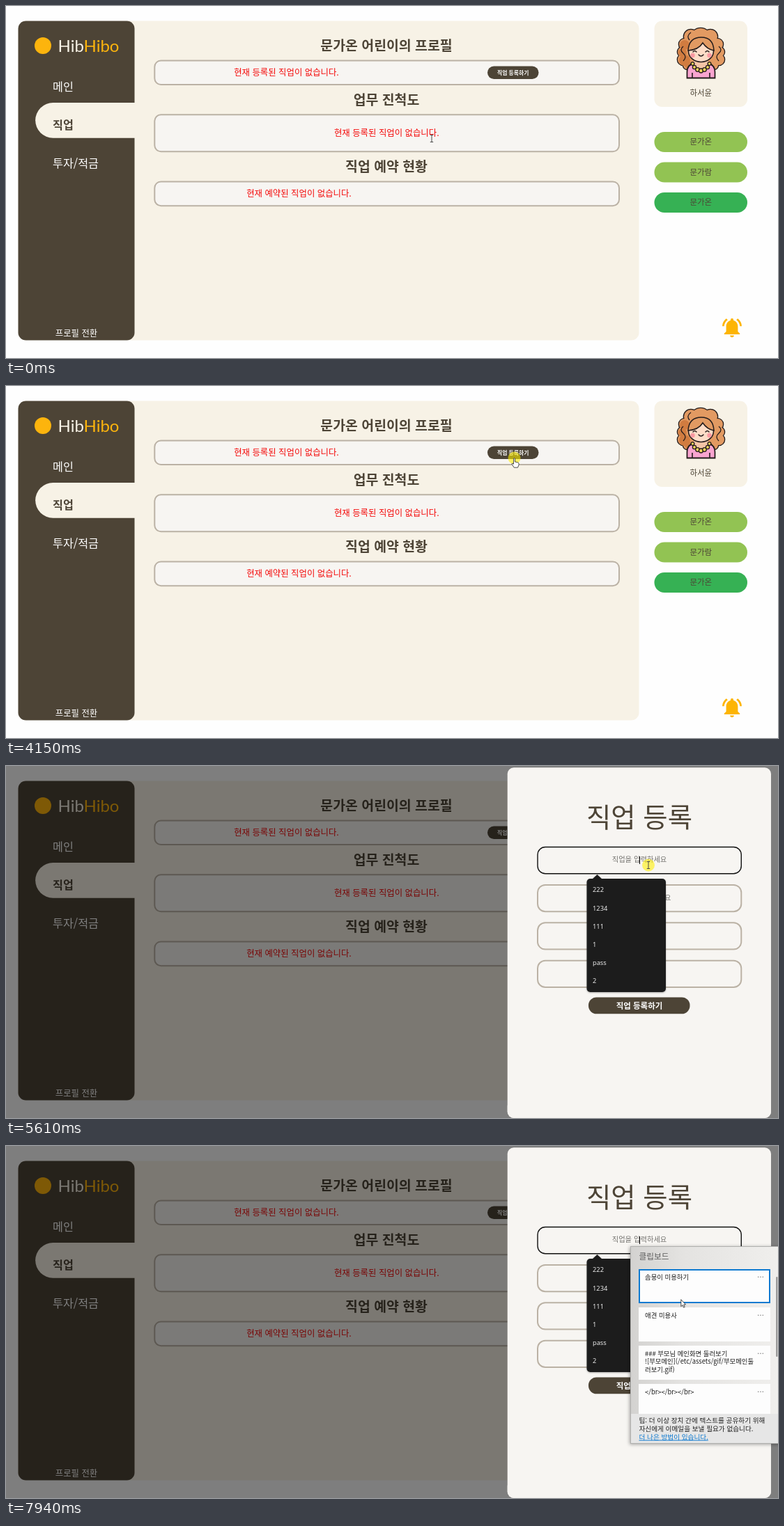
Write an HTML page that moves like this. It is 1108x506 px and loops after 8000 ms.

```html
<!DOCTYPE html>
<html lang="ko">
<head>
<meta charset="utf-8">
<title>직업 등록</title>
<style>
  html, body { margin: 0; width: 100%; height: 100%; overflow: hidden; background: #fefefe; }
  svg { display: block; width: 1108px; height: 506px; font-family: "Noto Sans CJK KR", "Noto Sans CJK", sans-serif; }
  .latin { font-family: "Open Sans", "Noto Sans", sans-serif; }
  .logo { font-family: Lato, sans-serif; }
</style>
</head>
<body>
<svg id="stage" viewBox="0 0 1108 506" xmlns="http://www.w3.org/2000/svg"></svg>
<script>
const LOOP = 8000;
const DARK = '#4d4436', CREAM = '#f7f2e6', PALE = '#f7f5f2', LINE = '#bbb2a5', RED = '#f40a0a';

// Text placed by its vertical middle
const text = (s, x, cy, size, fill, weight = 400, anchor = 'middle', extra = '') =>
  `<text x="${x}" y="${cy + size * 0.37}" font-size="${size}" fill="${fill}" font-weight="${weight}" text-anchor="${anchor}" ${extra}>${s}</text>`;
const left = (s, x, cy, size, fill, weight, extra) => text(s, x, cy, size, fill, weight, 'start', extra);
const box = (x, y, r, b, rx, fill, extra = '') =>
  `<rect x="${x}" y="${y}" width="${r - x}" height="${b - y}" rx="${rx}" fill="${fill}" ${extra}/>`;
const framed = (x, y, r, b, rx, id = '') =>
  box(x, y, r, b, rx, PALE, `stroke="${LINE}" stroke-width="2" ${id && `id="${id}"`}`);
const circles = (list, attrs) =>
  `<g ${attrs}>${list.map(([x, y, r]) => `<circle cx="${x}" cy="${y}" r="${r}"/>`).join('')}</g>`;

function sidebar() {
  return box(17.5, 21.5, 908.5, 480.5, 11, CREAM) +
    box(17.5, 21.5, 184.5, 480.5, 11, DARK) +
    `<path d="M185 139H67.5a25.3 25.3 0 0 0 0 50.7H185z" fill="${CREAM}"/>` +
    '<circle cx="53" cy="57" r="12" fill="#fdb40d"/>' +
    `<text class="logo" x="74.5" y="66" font-size="24" fill="${CREAM}">Hib<tspan fill="#fdb40d">Hibo</tspan></text>` +
    left('메인', 67, 116, 16.2, '#fff', 500) +
    left('직업', 67, 171, 16.2, DARK, 700) +
    left('투자/적금', 67, 226, 16.2, '#fff', 500) +
    text('프로필 전환', 101, 470.5, 12.4, '#fff', 500);
}

function profile() {
  const head = (s, y) => text(s, 546, y, 19.4, DARK, 700);
  return head('문가온 어린이의 프로필', 57) +
    framed(213.3, 78.5, 880, 113, 9) +
    text('현재 등록된 직업이 없습니다.', 402.5, 95.8, 12.4, RED) +
    box(691, 86.5, 764.5, 105, 9.2, DARK) +
    text('직업 등록하기', 727.7, 95.8, 7.8, '#fff', 700) +
    head('업무 진척도', 135) +
    framed(213.3, 156.3, 880, 209.3, 9) +
    text('현재 등록된 직업이 없습니다.', 546.3, 182.8, 12.4, RED) +
    head('직업 예약 현황', 231) +
    framed(213.3, 252.5, 880, 287.2, 9) +
    text('현재 예약된 직업이 없습니다.', 420.5, 269.8, 12.4, RED);
}

function avatar() {
  const ink = '#241c1c';
  const hair = [[997, 46, 14], [983, 44, 10], [1011, 44, 10], [974, 55, 8], [1021, 55, 8], [971, 66, 7],
    [1024, 66, 7], [972, 77, 8], [1023, 77, 8], [978, 85, 6], [1016, 85, 6], [997, 66, 24]];
  const beads = [[985.5, 83, 2.4], [988, 88, 2.6], [992.5, 91.5, 2.8], [997.5, 93, 3], [1002.5, 91.5, 2.8], [1007, 88, 2.6], [1009.5, 83, 2.4]];
  return circles(hair, `fill="${ink}" stroke="${ink}" stroke-width="2.6"`) +
    circles(hair, 'fill="#e29a62"') +
    circles([[974, 56, 7], [971, 67, 6], [974, 78, 8], [979, 85, 5]], 'fill="#d17c40"') +
    `<path d="M977.5 103.5V95q0-11 11-13h18q11 2 11 13v8.5z" fill="#f9a4d0" stroke="${ink}" stroke-width="1.8"/>
    <path d="M987 82q10 17 21 0v-6h-21z" fill="#f6c5a6"/>
    <path d="M985 96v7M1010 96v7" stroke="${ink}" stroke-width="1.6"/>` +
    circles(beads, `fill="#f4d45c" stroke="${ink}" stroke-width="1.3"`) +
    `<ellipse cx="997.5" cy="65" rx="18" ry="15.5" fill="#fddcc7" stroke="${ink}" stroke-width="1.6"/>
    <path d="M979 64q1-19 19-19 17 0 18 19-10-2-16-11-6 10-21 11z" fill="#e29a62" stroke="${ink}" stroke-width="1.5"/>
    <path d="M972 58q-6 5 0 10t0 11M1023 58q6 5 0 10t0 11M983 38q-7 5-2 11" fill="none" stroke="${ink}" stroke-width="1.3"/>
    <path d="M986 66q2.500-3 5 0M1004 66q2.500-3 5 0M994 70q3.500 4 7 0" fill="none" stroke="${ink}" stroke-width="1.5" stroke-linecap="round"/>` +
    circles([[985.5, 71, 3.2], [1009.5, 71, 3.2]], 'fill="#fb9aa2"');
}

function family() {
  const pill = (name, y, fill) => box(930.5, y, 1064, y + 29, 14.5, fill) + text(name, 997.3, y + 14, 11.5, DARK);
  return box(930.5, 21.5, 1064, 145, 11, CREAM) + avatar() +
    text('하서윤', 997.3, 125, 11.5, DARK) +
    pill('문가온', 181, '#92c353') + pill('문가람', 224.5, '#92c353') + pill('문가온', 268, '#36b154') +
    `<path transform="translate(1025.200 445.500) scale(1.4)" fill="#fdb504" d="M7.6 4.100 6.150 2.650A10.300 10.300 0 0 0 2 10.500h2a8.400 8.400 0 0 1 3.600-6.400zM20 10.500h2a10.300 10.300 0 0 0-4.150-7.850L16.400 4.100a8.400 8.400 0 0 1 3.600 6.400zM18 11c0-3.070-1.640-5.640-4.500-6.320V4a1.500 1.500 0 0 0-3 0v.68C7.630 5.360 6 7.920 6 11v5l-2 2v1h16v-1l-2-2zM12 22a2 2 0 0 0 2-2h-4a2 2 0 0 0 2 2z"/>`;
}

function modal() {
  const field = (i, id) => framed(763, 116.500 + i * 54.4, 1055.3, 154.800 + i * 54.4, 11, id);
  const hint = '#757470';
  return '<g id="modal">' + box(0, 0, 1108, 506, 0, '#000', 'opacity=".5"') +
    box(719.7, 2.3, 1098, 506, 9, PALE) + box(719.7, 480, 1098, 506, 9, PALE) +
    text('직업 등록', 909, 74, 38.4, DARK, 500) +
    field(0, 'jobField') + field(1) + field(2) + field(3) +
    text('직업을 입력하세요', 909, 134.5, 10.3, hint) +
    text('할 업무를 입력하세요', 909, 189, 10.3, hint) +
    text('0', 903.5, 243.3, 12, '#111') + text('0', 903.5, 297.7, 12, '#111') +
    box(836, 332.5, 981.5, 356.3, 11.5, DARK) +
    text('직업 등록하기', 909, 344.5, 11.5, '#fff', 700) +
    box(909, 130, 910, 141, 0, '#111', 'id="caret"') + '</g>';
}

function suggestions() {
  const rows = ['222', '1234', '111', '1', 'pass', '2'];
  return '<g id="suggest" filter="url(#soft)"><path d="M841.500 162.500l7-6.500 7 6.500z" fill="#1f1f1f"/>' +
    box(833.5, 162, 947, 325, 5, '#1f1f1f') +
    rows.map((s, i) => left(s, 842, 178 + i * 26.15, 9.3, '#f2f2f2', 400, 'class="latin"')).join('') + '</g>';
}

function clipboard() {
  const items = [['흰 자리'], ['애견 미용사'], ['### 부모님 메인화면 둘러보기', '![부모메인](/etc/assets/gif/부모메인둘', '러보기.gif)'],
    ['&lt;/br&gt;&lt;/br&gt;&lt;/br&gt;']];
  items[0] = ['솜뭉이 미용하기'];
  const cards = items.map((lines, i) => {
    const y = 177 + i * 55;
    return box(908, y, 1097, Math.min(y + 49, 385), 0, '#fdfdfd') +
      lines.map((s, k) => left(s, 917, y + 11.3 + k * 11.7, 9.4, '#1c1c1c')).join('') +
      circles([-3.3, 0, 3.3].map(d => [1083 + d, y + 11.3, 0.75]), 'fill="#777"');
  }).join('');
  return '<g id="clip">' + box(896.5, 144.5, 1112, 427.5, 0, 'url(#glass)', 'stroke="#b0b0ae" filter="url(#shade)"') +
    left('클립보드', 908.5, 159, 11.7, '#5c5c5c', 300) + cards +
    box(897, 385, 1108, 427, 0, '#e6e6e6') +
    left('팁: 더 이상 장치 간에 텍스트를 공유하기 위해', 908.5, 394, 9.65, '#222') +
    left('자신에게 이메일을 보낼 필요가 없습니다.', 908.5, 406, 9.65, '#222') +
    left('더 나은 방법이 있습니다.', 908.5, 418, 9.65, '#0a78d0', 400, 'text-decoration="underline"') +
    '<g id="hover">' + box(909, 178, 1096, 225, 0, 'none', 'stroke="#0f7ad0" stroke-width="2"') +
    box(1105.3, 188, 1107.3, 303, 1, '#8b8b8b') + '</g></g>';
}

const pointer = `<circle id="glow" r="9" fill="#fff000" opacity=".58"/>
  <g id="cursor">
    <path id="beam" d="M-2.200-5H2.200M0-5V5M-2.200 5H2.200" fill="none" stroke="#4a4a4a"/>
    <path id="arrow" d="M.3.4V10.400L2.500 8.300 4.100 11.900 5.700 11.200 4.200 7.700H7z" fill="#fff" stroke="#222" stroke-width=".8"/>
    <path id="hand" d="M-1 1.300q0-1.100 1-1.100t1 1.100V5.500L4.800 6.300q1.700.4 1.700 2V10L5 13.700H-.3L-3.300 9q-.5-1.400.9-1.300L-1 8.800z" fill="#fff" stroke="#222" stroke-width=".8"/>
  </g>`;

const defs = `<defs>
  <linearGradient id="glass"><stop offset="0" stop-color="#d3d2d0"/><stop offset=".35" stop-color="#e4e3e1"/><stop offset="1" stop-color="#f0efed"/></linearGradient>
  <filter id="shade"><feDropShadow dx="-1" dy="1" stdDeviation="2.500" flood-opacity=".35"/></filter>
  <filter id="soft"><feDropShadow dx="0" dy="1" stdDeviation="1" flood-opacity=".3"/></filter>
</defs>`;

document.getElementById('stage').innerHTML =
  defs + sidebar() + profile() + family() + modal() + suggestions() + clipboard() + pointer;
const $ = id => document.getElementById(id);
const show = (id, on) => $(id).setAttribute('visibility', on ? 'inherit' : 'hidden');

// Pointer moves: start, end, steps, target x, target y
const moves = [
  [70, 400, 5, 655, 167], [730, 730, 1, 653.5, 166], [1400, 2150, 11, 730, 101],
  [4150, 4220, 2, 729, 106], [4480, 4550, 2, 729, 97], [4820, 4820, 1, 729.5, 97],
  [5150, 5340, 4, 915, 152], [5400, 5400, 1, 922, 142.5],
  [5870, 5940, 2, 921, 142.5], [6140, 6270, 3, 920, 142.5],
  [7080, 7080, 1, 918.5, 141], [7200, 7870, 11, 970, 226], [7940, 7940, 1, 968.5, 220.3],
];

function pointerAt(t) {
  let x = 611, y = 190.5;
  for (const [start, end, steps, tx, ty] of moves) {
    if (t < start) break;
    const done = t >= end ? 1 : (Math.floor((t - start) / (end - start) * (steps - 1)) + 1) / steps;
    const ease = done * done * (3 - 2 * done);
    x += (tx - x) * ease;
    y += (ty - y) * ease;
  }
  return [x, y];
}

function render(t) {
  const [x, y] = pointerAt(t);
  const open = t >= 4820, focus = t >= 5610, clip = t >= 7080;
  const shape = !open ? (x < 622 ? 'beam' : y < 106.5 && x > 691 ? 'hand' : 'arrow')
    : !clip && x > 763 && y > 116 ? 'beam' : 'arrow';
  for (const id of ['beam', 'arrow', 'hand']) show(id, id === shape);
  $('cursor').setAttribute('transform', `translate(${x} ${y})`);
  $('glow').setAttribute('transform', `translate(${x} ${y})`);
  show('glow', (t >= 2810 && !open) || (t >= 5540 && t < 5670));
  show('modal', open);
  show('suggest', focus);
  show('caret', focus && Math.floor((t - 5610) / 530) % 2 === 0);
  show('clip', clip);
  show('hover', clip && y > 177);
  $('jobField').setAttribute('stroke', focus ? '#111' : LINE);
  $('jobField').setAttribute('stroke-width', focus ? 1.4 : 2);
}

const origin = performance.now();
function tick() {
  render((performance.now() - origin) % LOOP);
  requestAnimationFrame(tick);
}
tick();
</script>
</body>
</html>
```
